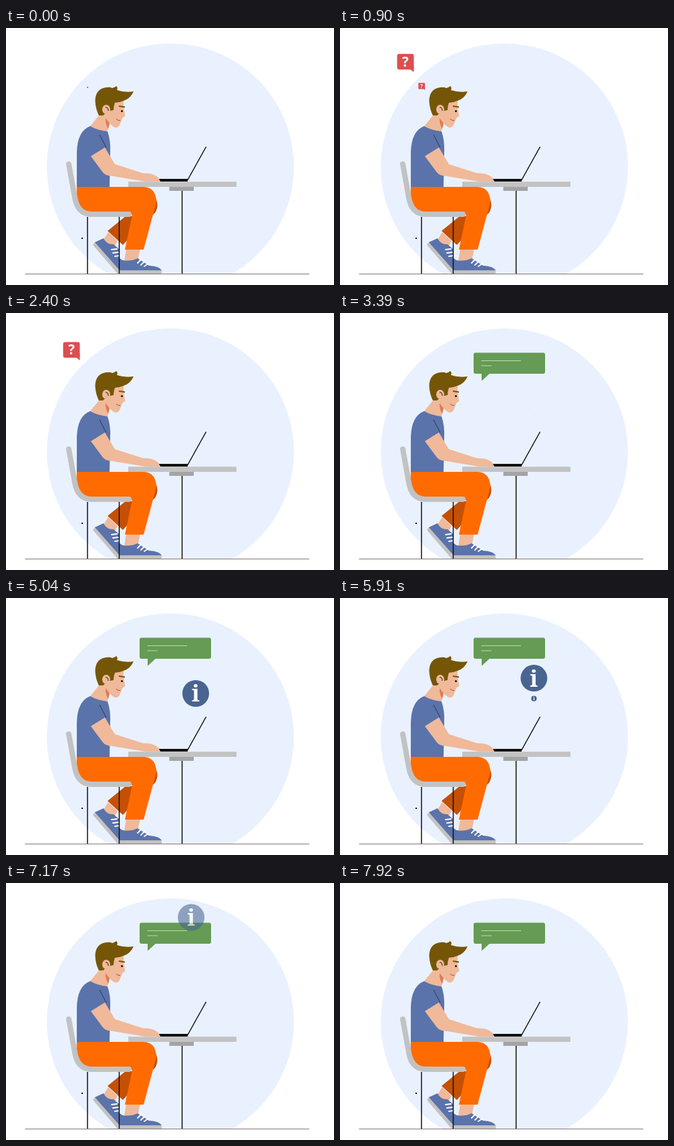
An HTML page that plays this animation: 491 by 385 pixels, repeating every 9090 ms.

```html
<!DOCTYPE html>
<html lang="en">
<head>
<meta charset="utf-8">
<title>At the desk</title>
<style>
  html, body { margin: 0; width: 100%; height: 100%; overflow: hidden; background: #fff; }
  svg { display: block; width: 100%; height: 100%; }
  text { fill: #fff; font-weight: 700; text-anchor: middle; }
  .ask text { font-family: "Open Sans", "Noto Sans", sans-serif; font-size: 20.5px; }
  .info text { font-family: "Noto Serif", "DejaVu Serif", serif; font-size: 34px; }
  .skin { fill: #f0b999; }
  .shirt { fill: #5a73ab; }
  .trousers { fill: #ff6b00; }
  .shade { fill: #c45005; }
  .hair { fill: #755606; }
  .sole { fill: #c2c2c2; }
  .line { fill: none; stroke: #101010; stroke-width: 1.5; }
  .thin { fill: none; stroke-width: 1; }
  .lace { fill: none; stroke: #fff; stroke-width: 1.8; stroke-linecap: round; }
</style>
</head>
<body>
<svg viewBox="0 0 491 385" xmlns="http://www.w3.org/2000/svg">
  <clipPath id="aboveFloor"><path d="M0 0H491V368H0Z"/></clipPath>
  <circle cx="246" cy="208" r="185" fill="#e9f1ff" clip-path="url(#aboveFloor)"/>

  <!-- far leg -->
  <path class="shade" d="M221 250Q231 264 223 277L212 287ZM179 282H190L184 315L175 325L152 304Z"/>
  <path class="skin" d="M153 306L167 319L162 328Q150 326 146 317Z"/>
  <path class="sole" d="M134 320L130 325L167 368H172V362Z"/>
  <path class="shirt" d="M133 321L146 315Q151 325 161 324L170 332V345L181 352L172 363L170 363Z"/>
  <path class="lace" d="M158 332L166 331M160 337L168 336M163 342L170 341"/>

  <!-- near leg -->
  <path class="skin" d="M180 331H201L197 349H177Z"/>
  <g id="shoe">
    <path class="sole" d="M170 362H233V368H170Z"/>
    <path class="shirt" d="M175 348Q187 350 197 345L214 356Q230 357 233 363H170Q171 355 175 348Z"/>
    <path class="lace" d="M202 347L197 352M207 350L202 355M213 353L207 357"/>
  </g>
  <path class="trousers" d="M106 238H206Q225 239 225 261L206 332H178L189 280H120Q104 270 106 238Z"/>

  <!-- table -->
  <path fill="#c3c3c3" d="M183 230.3H345V238H183Z"/>
  <path fill="#a4a4a4" d="M244.5 238H281V244H244.5Z"/>
  <path class="line" d="M263.6 244V368"/>

  <!-- head -->
  <path class="skin" d="M140 130L126 147Q136 158 151 157L155 145V130Z"/>
  <path fill="#dc7c54" d="M149 135L155 142L153 151Q149 145 149 135Z"/>
  <path class="skin" d="M148 112L176 108V119L178.5 132L174.5 134.5L171 143Q169 150 163 149Q155 145 149 134Z"/>
  <path class="hair" d="M139 131Q134 121 133.500 109Q134 91 150 89Q156 88 159 90Q163 89 165 87Q168 89 166 93Q178 97 191 95Q186 106 176 109Q169 112 163 112Q161 118 161 123L156 124L145 131Z"/>
  <ellipse class="skin" cx="150" cy="122" rx="6" ry="7"/>
  <path class="thin" stroke="#101010" d="M149 119Q153 118 153 124"/>
  <path fill="none" stroke="#755606" stroke-width="2" d="M169 117L178 118.5"/>
  <circle cx="173.5" cy="124.5" r="1.5" fill="#101010"/>
  <path class="thin" stroke="#a34b32" d="M165 136Q167 139 171 138.5"/>

  <!-- body and arm -->
  <path class="shirt" d="M126 147Q136 153 152 155Q157 169 156 187L155 238H106V186Q107 154 126 147Z"/>
  <path class="skin" d="M127 192L148 179L163 204L205 217.5Q224 217 230 227V230H208L157 221.500Q148 221 144 215Z"/>
  <path class="thin" stroke="#27365f" d="M140 160L150 179"/>

  <!-- laptop -->
  <path fill="#101010" d="M229 226H272V230H231Z"/>
  <path class="line" d="M271.7 228L299.5 178"/>

  <!-- chair -->
  <path d="M94 204L103 254Q107 278 127 279H184" fill="none" stroke="#c2c2c2" stroke-width="8" stroke-linecap="round"/>
  <path class="line" d="M122 283V368M169.5 283V368"/>
  <path fill="#101010" d="M113 314H115V316H113Z"/>
  <path class="thin" d="M28.5 368.5H454" stroke="#857878"/>

  <g id="speech">
    <rect x="-53.5" y="-15.7" width="107" height="31.5" rx="3" fill="#659b55"/>
    <path fill="#659b55" d="M-41.500 15V26.500L-29 15Z"/>
    <path class="thin" d="M-42 -3.700H17.5M-42 3.800H-26.5" stroke="#bcdcaa"/>
  </g>
  <g id="floating"></g>
</svg>
<script>
const LOOP = 9090;
const shapes = {
  ask: '<rect x="-12.5" y="-12" width="25" height="23.5" rx="3" fill="#dc4f4f"/><path fill="#dc4f4f" d="M7 11L12.5 15.5V6Z"/><text y="7">?</text>',
  info: '<circle r="20" fill="#4a6491"/><text y="12.5">i</text>'
};

function add(kind) {
  const g = document.createElementNS('http://www.w3.org/2000/svg', 'g');
  g.setAttribute('class', kind);
  g.innerHTML = shapes[kind];
  document.getElementById('floating').append(g);
  return g;
}

const clamp = p => Math.min(1, Math.max(0, p));
const smooth = p => p * p * (3 - 2 * p);
const quadInOut = p => p < .5 ? 2 * p * p : 1 - 2 * (1 - p) ** 2;
const progress = (t, start, length) => clamp((t - start) / length);

// Grows from nothing, overshoots and settles at 1
function pop(p, bounce) {
  const q = p - 1;
  return 1 + (bounce + 1) * q ** 3 + bounce * q * q;
}

function place(el, x, y, scale, opacity = 1) {
  el.setAttribute('transform', `translate(${x} ${y}) scale(${Math.max(0, scale)})`);
  el.setAttribute('opacity', opacity);
}

// Question marks leave the head in turn, to the left and straight up
const questions = [-24, 5.5, -24].map((drift, i) =>
  ({ el: add('ask'), drift, size: drift < 0 ? 1 : .84, start: 790 * i }));

function drawQuestion({ el, drift, size, start }, t) {
  const p = progress(t, start, 1500);
  const grown = clamp(p / .55);
  const x = 122 + drift * smooth(grown);
  const y = 89 - 78 * p ** 1.4;
  place(el, x, y, size * grown ** .38, clamp((1 - p) / .2));
}

// Small info marks follow one winding path behind the large one
const trail = [0, 1, 2].map(i => ({ el: add('info'), start: 5860 + 325 * i }));
const largeInfo = add('info');

function drawTrail({ el, start }, t) {
  const age = Math.max(0, t - start);
  const x = 288 + 12 * Math.sin(age * .0039);
  const scale = clamp(age / 60) * (.22 + age * .00042);
  place(el, x, 154 - age * .065, scale, 1 - progress(t, 6660, 240));
}

function drawLargeInfo(t) {
  const p = progress(t, 5040, 2520);
  const rise = quadInOut(p);
  const x = 284 + 7 * Math.sin(1.5 * Math.PI * rise);
  place(largeInfo, x, 143 - 96 * rise, pop(progress(t, 3390, 510), 3.4), clamp((1 - p) / .27));
}

// The toe taps about the heel, then rests until the loop restarts
function toeAngle(t) {
  const beat = (t - 90) % 840;
  const tapping = beat > 0 && beat < 270 && t < 7920;
  return tapping ? -7 * Math.sin(Math.PI * beat / 270) ** 2 : 0;
}

const speech = document.getElementById('speech');
const shoe = document.getElementById('shoe');

function draw(t) {
  questions.forEach(q => drawQuestion(q, t));
  trail.forEach(mark => drawTrail(mark, t));
  drawLargeInfo(t);
  place(speech, 253.5, 75.2, pop(progress(t, 2790, 420), 2.5));
  shoe.setAttribute('transform', `rotate(${toeAngle(t)} 172 367)`);
}

const began = performance.now();
function tick() {
  draw((performance.now() - began) % LOOP);
  requestAnimationFrame(tick);
}
tick();
</script>
</body>
</html>
```
